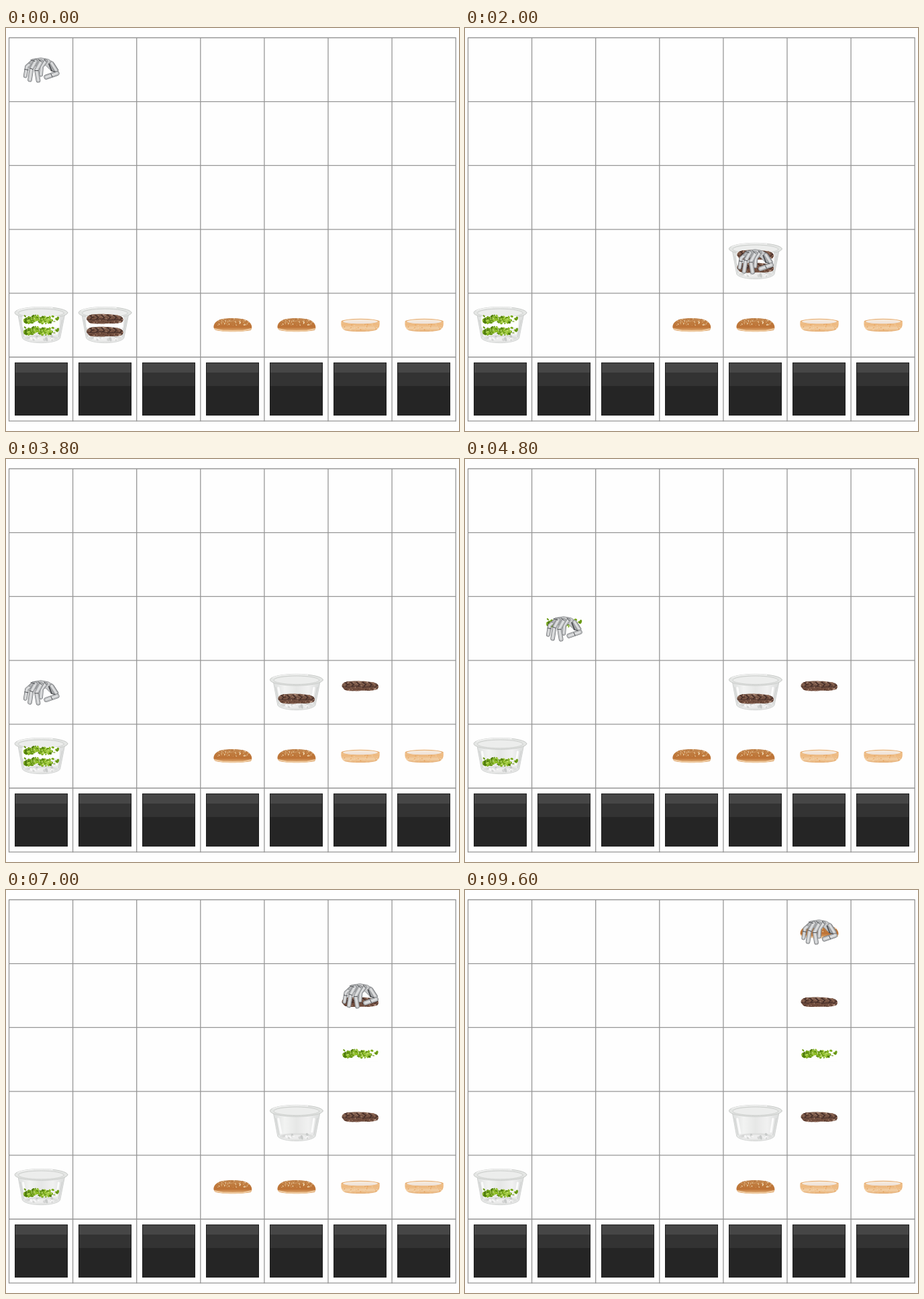
Animation of 675 by 600 pixels, one loop 10 s. Source, as an HTML page with a canvas:

```html
<!DOCTYPE html>
<html lang="en">
<head>
<meta charset="utf-8">
<title>Burger grid</title>
<style>
  html, body { margin: 0; width: 100%; height: 100%; overflow: hidden; background: #fefefe; }
  canvas { display: block; }
</style>
</head>
<body>
<canvas id="stage" width="675" height="600"></canvas>
<script>
const ctx = document.getElementById('stage').getContext('2d');
const LOOP = 10000, STEP = 200, CELL = 95.1, LEFT = 4.5, TOP = 14.5;
const DIRS = { R: [1, 0], L: [-1, 0], U: [0, -1], D: [0, 1] };

// kind, column, row, vertical offset inside the cell
const ITEMS = [
  ['cup', 0, 4, 0], ['lettuce', 0, 4, 31], ['lettuce', 0, 4, 48],
  ['cup', 1, 4, 0], ['patty', 1, 4, 31], ['patty', 1, 4, 50],
  ['bunTop', 3, 4, 0], ['bunTop', 4, 4, 0],
  ['bunBase', 5, 4, 0], ['bunBase', 6, 4, 0]
];

// start time, path, carried items
const MOVES = [
  [200, 'RDDDD', []],
  [1400, 'URRR', [3, 4, 5]],
  [2600, 'R', [4]],
  [3000, 'LLLLLD', []],
  [4400, 'UURRRRR', [1]],
  [6000, 'LD', []],
  [6600, 'UUR', [5]],
  [7400, 'LLDDD', []],
  [8600, 'UUUURR', [6]]
];

function seeded(seed) {
  return () => (seed = (seed * 16807) % 2147483647) / 2147483647;
}

function shape(points) {
  ctx.beginPath();
  points.forEach(([x, y], i) => i ? ctx.lineTo(x, y) : ctx.moveTo(x, y));
}

function oval(x, y, rx, ry, fill, angle = 0) {
  ctx.beginPath();
  ctx.ellipse(x, y, rx, ry, angle, 0, Math.PI * 2);
  if (fill) { ctx.fillStyle = fill; ctx.fill(); }
}

function ramp(x0, y0, x1, y1, ...colors) {
  const g = ctx.createLinearGradient(x0, y0, x1, y1);
  colors.forEach((c, i) => g.addColorStop(i / (colors.length - 1), c));
  return g;
}

function specks(rand, n, x, y, w, h, size, colors) {
  for (let i = 0; i < n; i++) {
    oval(x + rand() * w, y + rand() * h, size * (0.5 + rand()), size * (0.4 + rand() * 0.5),
      colors[Math.floor(rand() * colors.length)], rand() * 3);
  }
}

const draw = {
  cup() {
    ctx.beginPath();
    ctx.moveTo(13.5, 32);
    ctx.lineTo(20, 67);
    ctx.bezierCurveTo(27, 76, 69, 76, 76, 67);
    ctx.lineTo(83, 32);
    ctx.closePath();
    ctx.fillStyle = ramp(13, 0, 83, 0, '#dcdedd', '#f2f3f2', '#e6e7e6', '#f1f1f1', '#d9dbda');
    ctx.fill();
    ctx.strokeStyle = '#cfd1d0';
    ctx.lineWidth = 1;
    ctx.stroke();
    oval(48, 67, 25, 5, '#dedfde');
    oval(48, 68, 20, 3, '#ededed');
    specks(seeded(41), 14, 30, 64, 36, 6, 2, ['#c8cac9', '#f8f8f8', '#d5d6d5']);
    ctx.lineCap = 'round';
    ctx.lineWidth = 3;
    ctx.strokeStyle = '#fbfbfb';
    shape([[21, 41], [25, 62]]); ctx.stroke();
    shape([[74, 41], [71, 60]]); ctx.stroke();
    ctx.lineWidth = 1;
    ctx.strokeStyle = '#cccecd';
    shape([[17, 40], [22, 65]]); ctx.stroke();
    shape([[79, 40], [74, 65]]); ctx.stroke();
    oval(48, 29, 39.5, 8.5, '#e4e6e4');
    ctx.strokeStyle = '#c9cbc9';
    ctx.stroke();
    oval(48, 29.5, 34, 6.3, '#ecedec');
    ctx.strokeStyle = '#cdcfcd';
    ctx.stroke();
    ctx.beginPath();
    ctx.ellipse(48, 28, 37, 7, 0, Math.PI * 1.1, Math.PI * 1.65);
    ctx.strokeStyle = '#fafafa';
    ctx.stroke();
  },

  patty() {
    const rand = seeded(17);
    ctx.beginPath();
    ctx.moveTo(20.5, 8);
    ctx.bezierCurveTo(20, 3, 25, 1, 30, 0.5);
    ctx.bezierCurveTo(40, -1, 58, 0, 68, 2);
    ctx.bezierCurveTo(76, 4, 76, 9, 73, 12);
    ctx.bezierCurveTo(64, 16, 54, 13, 46, 14.5);
    ctx.bezierCurveTo(36, 14, 30, 15.5, 24, 12.5);
    ctx.closePath();
    ctx.fillStyle = ramp(0, 0, 0, 15, '#80604f', '#765343', '#6b483a');
    ctx.save();
    ctx.fill();
    ctx.clip();
    specks(rand, 110, 20, 0, 55, 15, 1.4, ['#a17c69', '#5a3a2d', '#8c6755', '#b59483', '#674638']);
    ctx.strokeStyle = '#48302a';
    ctx.lineWidth = 1.7;
    for (let x = 24; x < 74; x += 9) {
      shape([[x, 1], [x + 5, 5], [x + 2, 8]]);
      ctx.stroke();
    }
    shape([[21, 8], [31, 9], [42, 7], [54, 9], [65, 8], [75, 10]]);
    ctx.lineWidth = 1.1;
    ctx.stroke();
    ctx.restore();
  },

  lettuce() {
    const rand = seeded(29);
    const tones = ['#6b9b16', '#8dbb29', '#527f0c', '#a6ce48', '#79aa1b'];
    for (let i = 0; i < 95; i++) {
      const u = rand(), x = 23 + u * 50;
      const mid = 7.5 + Math.sin(u * 13) * 1.1 + u * 1.2;
      const y = mid + (rand() - 0.5) * 10;
      oval(x, y, 1.2 + rand() * 1.8, 1 + rand() * 1.4, tones[i % 5], rand() * 3);
    }
    specks(rand, 22, 24, 5, 48, 7, 1, ['#c7e37c', '#3e690a', '#b9d95f']);
  },

  bunTop() {
    const rand = seeded(53);
    ctx.beginPath();
    ctx.moveTo(19.5, 50);
    ctx.bezierCurveTo(20, 42, 28, 38, 38, 37.5);
    ctx.bezierCurveTo(52, 36.5, 67, 37.5, 73, 43);
    ctx.bezierCurveTo(77, 47, 77.5, 52, 75, 55);
    ctx.bezierCurveTo(62, 58, 33, 58, 23, 55);
    ctx.quadraticCurveTo(20, 54, 19.5, 50);
    ctx.fillStyle = ramp(0, 37, 0, 57, '#c38a55', '#bf7b3e', '#bd7235', '#e2b27c');
    ctx.save();
    ctx.fill();
    ctx.clip();
    specks(rand, 65, 26, 37, 46, 11, 0.9, ['#f4dfbc', '#dba56b', '#b36d36', '#ead0a6']);
    ctx.strokeStyle = '#efcaa0';
    ctx.lineWidth = 2;
    shape([[20, 53], [33, 55.5], [48, 56], [64, 55.5], [76, 53]]);
    ctx.stroke();
    ctx.restore();
  },

  bunBase() {
    const rand = seeded(71);
    ctx.beginPath();
    ctx.moveTo(19.5, 42);
    ctx.bezierCurveTo(18.5, 49, 21, 54, 26, 55.5);
    ctx.bezierCurveTo(38, 57.8, 60, 57.8, 71, 55);
    ctx.bezierCurveTo(76, 53, 77.5, 47, 76.5, 41);
    ctx.closePath();
    ctx.fillStyle = ramp(0, 42, 0, 57, '#f0c491', '#edb87e', '#f2cfa6', '#e5ad73');
    ctx.save();
    ctx.fill();
    ctx.clip();
    specks(rand, 35, 20, 46, 56, 10, 1.2, ['#f3cea0', '#e6a868', '#f0c189']);
    ctx.restore();
    oval(48, 42, 28.5, 4.2, '#e9b47c');
    oval(48, 42.2, 26, 3.2, '#f5eade');
    oval(48, 43.3, 22, 1.7, '#f0e4da');
  },

  hand() {
    const limb = (pts, w) => {
      ctx.lineCap = ctx.lineJoin = 'round';
      shape(pts);
      ctx.lineWidth = w + 1.2;
      ctx.strokeStyle = '#727477';
      ctx.stroke();
      ctx.lineWidth = w;
      ctx.strokeStyle = '#b9bbbd';
      ctx.stroke();
      ctx.save();
      ctx.translate(-0.8, -0.4);
      ctx.lineWidth = w * 0.45;
      ctx.strokeStyle = '#dedfe0';
      ctx.stroke();
      ctx.restore();
    };
    const joint = (x0, y0, x1, y1, w = 1) => {
      shape([[x0, y0], [x1, y1]]);
      ctx.lineWidth = w;
      ctx.strokeStyle = '#4d4f52';
      ctx.stroke();
    };
    ctx.save();
    ctx.translate(20.5, 29);
    limb([[15, 6], [6, 14], [3.8, 28]], 4.6);
    shape([[9, 9], [14, 3], [27, 1], [38, 3], [46, 8], [53, 19], [50, 23], [41, 19], [34, 12], [25, 15]]);
    ctx.closePath();
    ctx.fillStyle = ramp(10, 0, 52, 22, '#a6a8aa', '#d2d3d4', '#9b9da0');
    ctx.fill();
    ctx.strokeStyle = '#85878a';
    ctx.lineWidth = 0.8;
    ctx.stroke();
    limb([[34, 6], [28, 14], [27, 26]], 4.8);
    limb([[19, 6], [13, 17], [10.5, 33.5]], 5.4);
    limb([[27, 7], [20.5, 19], [23, 34.5]], 5.6);
    limb([[43, 9], [50, 20]], 5);
    limb([[51, 24], [35, 29.5]], 6);
    joint(39, 10, 43, 20, 1.8);
    joint(42, 20, 48, 22, 1.2);
    joint(10, 16, 15, 18);
    joint(18, 20, 23, 20);
    joint(3, 18, 8, 19);
    joint(42, 25, 44, 29);
    joint(12, 4, 18, 6);
    joint(23, 3, 28, 7);
    joint(32, 3, 35, 7);
    ctx.restore();
  }
};

function inCell(col, row, dy, kind) {
  ctx.save();
  ctx.translate(LEFT + col * CELL, TOP + row * CELL + dy);
  draw[kind]();
  ctx.restore();
}

function band(x, y, h, color) {
  ctx.fillStyle = color;
  ctx.fillRect(x, y, 79, h);
}

function board() {
  ctx.fillStyle = '#fefefe';
  ctx.fillRect(0, 0, 675, 600);
  ctx.strokeStyle = '#969696';
  ctx.lineWidth = 1.3;
  for (let i = 0; i < 8; i++) {
    const x = LEFT + i * CELL;
    shape([[x, TOP - 0.6], [x, TOP + 6 * CELL + 0.6]]);
    ctx.stroke();
    if (i === 7) break;
    const y = TOP + i * CELL;
    shape([[LEFT, y], [LEFT + 7 * CELL, y]]);
    ctx.stroke();
  }
  for (let i = 0; i < 7; i++) {
    const x = 13 + i * 95;
    band(x, 498, 79, '#252525');
    band(x, 498, 15, '#464646');
    band(x, 513, 20, '#333333');
    ctx.strokeStyle = '#1f1f1f';
    ctx.lineWidth = 1;
    ctx.strokeRect(x + 0.5, 498.5, 78, 78);
  }
}

function stateAt(time) {
  const items = ITEMS.map(([kind, col, row, dy]) => ({ kind, col, row, dy }));
  const hand = { col: 0, row: 0 };
  for (const [start, path, carried] of MOVES) {
    const steps = Math.floor((time - start) / STEP) + 1;
    if (steps < 1) break;
    for (const d of path.slice(0, steps)) {
      for (const o of [hand, ...carried.map(i => items[i])]) {
        o.col += DIRS[d][0];
        o.row += DIRS[d][1];
      }
    }
  }
  return { items, hand };
}

function render(time) {
  const { items, hand } = stateAt(time);
  board();
  for (const it of items) {
    // upper fillings hide the cup behind them
    if (it.dy === 31) {
      ctx.fillStyle = '#fefefe';
      ctx.fillRect(LEFT + it.col * CELL + 20, TOP + it.row * CELL + 34, 55, 17);
    }
    inCell(it.col, it.row, it.dy, it.kind);
  }
  inCell(hand.col, hand.row, 0, 'hand');
}

let shown = -1;
const origin = performance.now();
function tick() {
  const time = (performance.now() - origin) % LOOP;
  const slot = Math.floor(time / STEP);
  if (slot !== shown) {
    shown = slot;
    render(time);
  }
  requestAnimationFrame(tick);
}
tick();
</script>
</body>
</html>
```
